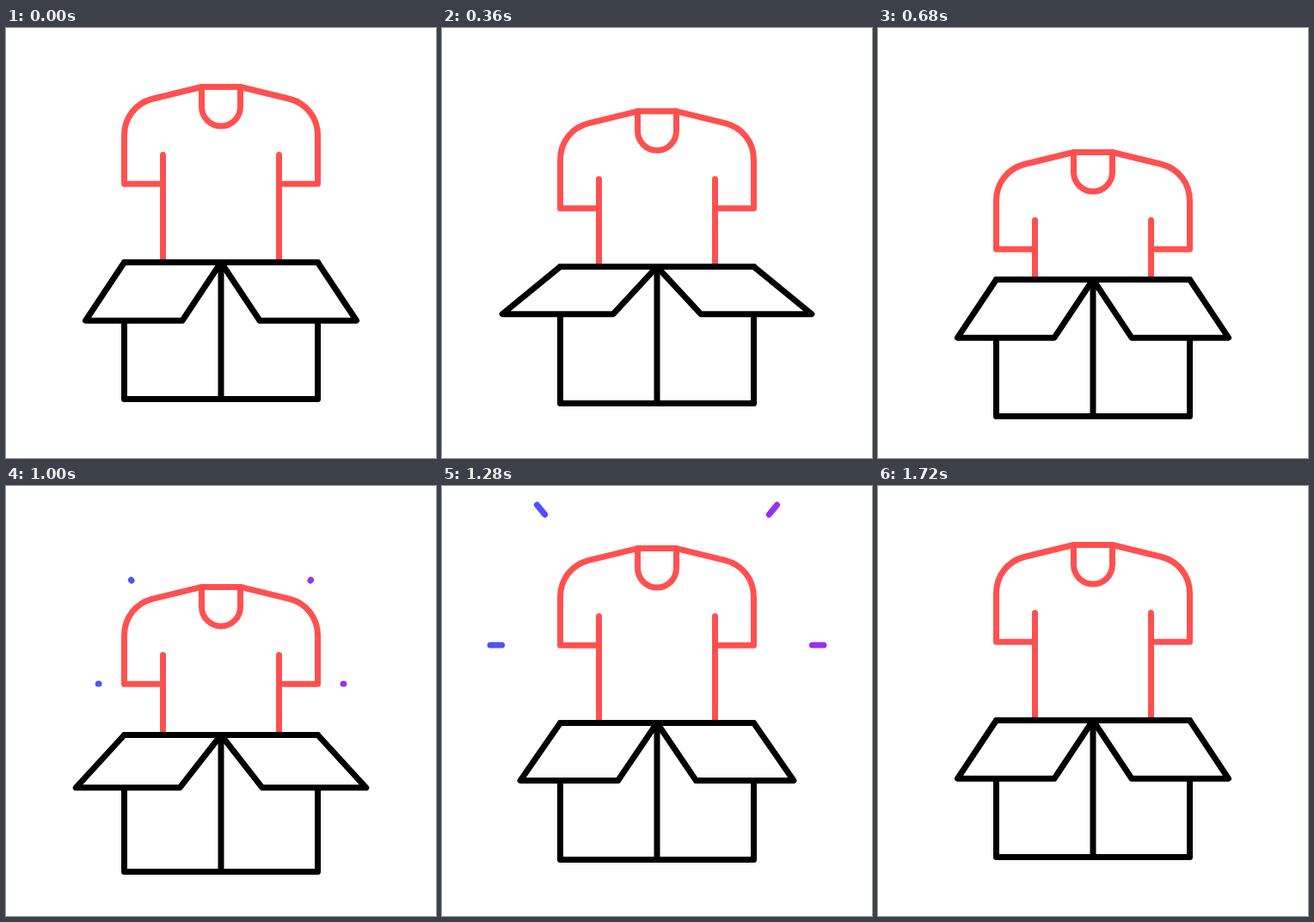
Animation, 500 px wide and 500 px high, one loop 1760 ms. Source, as an HTML page:

```html
<!DOCTYPE html>
<html lang="en">
<head>
<meta charset="utf-8">
<style>
  html, body { margin: 0; width: 100%; height: 100%; overflow: hidden; background: #fff; }
  svg { display: block; width: 100%; height: 100%; }
</style>
</head>
<body>
<svg viewBox="0 0 500 500" fill="none" stroke-width="7" stroke-linecap="round" stroke-linejoin="round">
  <g id="shirt" stroke="#ff5050">
    <path d="M182.5 181.3H137.5V125C137.5 104 151 87.500 170 82.500L227.500 68.500H272.500L330 82.500C349 87.500 362.500 104 362.500 125V181.300H317.500"/>
    <path d="M227.500 68.500V91.500a22.500 22.500 0 0 0 45 0V68.500M182.500 147.500V300M317.500 147.500V300"/>
    <g id="rays"></g>
  </g>
  <g id="box" stroke="#000" fill="#fff">
    <path d="M137.500 272.500H362.500V431.500H137.500ZM250 272.500V431.500"/>
    <path id="left"/>
    <path id="right"/>
  </g>
</svg>
<script>
const LOOP = 1760, STEP = 40;
const byId = id => document.getElementById(id);

// Rays run from near the shirt outwards: x1, y1, x2, y2, colour
const rays = [
  [108, 181, 52.5, 181, '#5050ff'],
  [146, 61, 108, 15, '#5050ff'],
  [392, 181, 447.5, 181, '#9632f0'],
  [354, 61, 392, 15, '#9632f0']
].map(([x1, y1, x2, y2, colour]) => {
  const line = document.createElementNS('http://www.w3.org/2000/svg', 'line');
  line.setAttribute('stroke', colour);
  byId('rays').append(line);
  return { line, x1, y1, dx: x2 - x1, dy: y2 - y1 };
});

// Progress along cubic-bezier(.5, 0, .5, 1) between two times
function ease(t, start, end) {
  const x = Math.min(1, Math.max(0, (t - start) / (end - start)));
  let low = 0, high = 1;
  for (let i = 0; i < 24; i++) {
    const s = (low + high) / 2;
    if (1.5 * s * (1 - s) + s ** 3 < x) low = s; else high = s;
  }
  return x === 0 || x === 1 ? x : low * low * (3 - 2 * low);
}

const moveY = (id, y) => byId(id).setAttribute('transform', `translate(0 ${y})`);

function drawFlap(id, side, open) {
  const x = offset => 250 + side * offset;
  const y = 340.2 - 12.7 * open;
  byId(id).setAttribute('d',
    `M${x(0)} 272.5H${x(112.5)}L${x(157.5 + 22.5 * open)} ${y}H${x(45 + 6 * open)}Z`);
}

function drawRays(t) {
  const head = ease(t, 960, 1360), tail = ease(t, 1040, 1440);
  byId('rays').setAttribute('visibility', head > 0 && tail < 1 ? 'visible' : 'hidden');
  for (const { line, x1, y1, dx, dy } of rays) {
    line.setAttribute('x1', x1 + dx * tail);
    line.setAttribute('y1', y1 + dy * tail);
    line.setAttribute('x2', x1 + dx * head);
    line.setAttribute('y2', y1 + dy * head);
  }
}

function draw(now) {
  const t = Math.floor(now % LOOP / STEP) * STEP;
  moveY('shirt', 76 * (ease(t, 115, 678) - ease(t, 695, 1411)));
  moveY('box', 20 * (ease(t, 168, 692) - ease(t, 804, 1476)));
  const open = ease(t, 80, 380) - ease(t, 447, 690) + ease(t, 885, 1115) - ease(t, 1115, 1320);
  drawFlap('left', -1, open);
  drawFlap('right', 1, open);
  drawRays(t);
}

let start;
function tick(now) {
  start ??= now;
  draw(now - start);
  requestAnimationFrame(tick);
}
draw(0);
requestAnimationFrame(tick);
</script>
</body>
</html>
```
